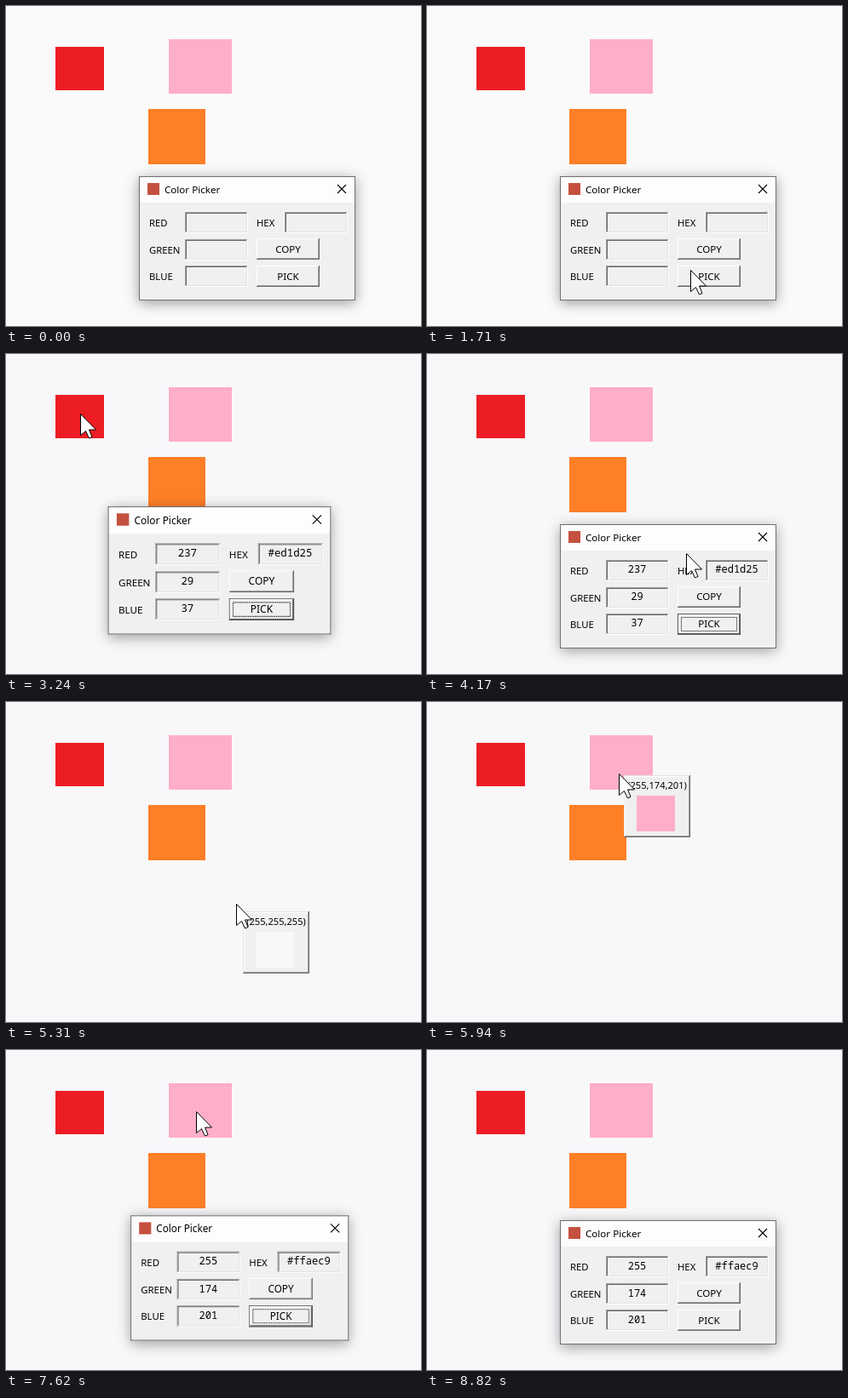
Animation, 487 px wide and 376 px high, one loop 8910 ms. Source, as an HTML page with a canvas:

```html
<!DOCTYPE html>
<html lang="en">
<head>
<meta charset="utf-8">
<title>Color Picker</title>
<style>
html, body { margin: 0; width: 100%; height: 100%; overflow: hidden; background: #fafafa; }
canvas { display: block; }
</style>
</head>
<body>
<canvas id="stage" width="487" height="376"></canvas>
<script>
const ctx = document.getElementById('stage').getContext('2d');
const LOOP = 8910;
const SANS = '"Noto Sans", "Open Sans", sans-serif';
const MONO = '"Noto Sans Mono", monospace';

// Clicks that start a pick, and the moments the dialog returns.
const PICK_1 = 1950, DONE_1 = 3240, PICK_2 = 4920, DONE_2 = 7530, BLUR = 8800;

const RED = [237, 29, 37], PINK = [255, 174, 201], ORANGE = [255, 127, 39];
const squares = [
  { x: 58, y: 48, w: 57, h: 51, rgb: RED },
  { x: 191, y: 39, w: 74, h: 64, rgb: PINK },
  { x: 167, y: 121, w: 67, h: 65, rgb: ORANGE }
];
const css = rgb => `rgb(${rgb})`;
const hex = rgb => '#' + rgb.map(v => v.toString(16).padStart(2, '0')).join('');

const smooth = u => u * u * (3 - 2 * u);
const drift = u => u ** 1.33;
const out = u => 1 - (1 - u) ** 2;

// Each move leaves the previous resting place; bend bows it sideways.
const START = { x: 490, y: 65 };
const moves = [
  { from: 390, to: 600, x: 451, y: 91 },
  { from: 930, to: 1350, x: 312, y: 281, bend: 0.08 },
  { from: 1560, to: 1710, x: 309, y: 310 },
  { from: 2010, to: 2790, x: 87, y: 70 },
  { from: 3360, to: 4110, x: 303, y: 232 },
  { from: 4140, to: 4500, x: 309, y: 319, bend: -0.07 },
  { from: 4920, to: 5790, x: 230, y: 70, bend: -0.05, ease: drift },
  { from: 5820, to: 6270, x: 200, y: 147 },
  { from: 6450, to: 6650, x: 112, y: 81, bend: 0.04, ease: out },
  { from: 6900, to: 7050, x: 223, y: 72 },
  { from: 7650, to: 8370, x: 330, y: 250 },
  { from: 8430, to: 8820, x: 492, y: 40 }
];

function pointer(t) {
  let { x, y } = START;
  for (const { from, to, x: x2, y: y2, bend = 0, ease = smooth } of moves) {
    if (t <= from) break;
    const e = ease(Math.min(1, (t - from) / (to - from)));
    const bow = bend * 4 * e * (1 - e);
    const dx = x2 - x, dy = y2 - y;
    x += dx * e - dy * bow;
    y += dy * e + dx * bow;
  }
  return { x, y };
}

function box(x, y, w, h, color) {
  ctx.fillStyle = color;
  ctx.fillRect(x, y, w, h);
}

function corner(x, y, w, h, light, dark) {
  box(x, y, w, 1, light);
  box(x, y, 1, h, light);
  box(x, y + h - 1, w, 1, dark);
  box(x + w - 1, y, 1, h, dark);
}

function bevel(x, y, w, h, outer, inner) {
  corner(x, y, w, h, ...outer);
  corner(x + 1, y + 1, w - 2, h - 2, ...inner);
}

function text(str, x, y, size = 11.3, align = 'left', font = SANS) {
  ctx.font = size + 'px ' + font;
  ctx.textAlign = align;
  ctx.fillStyle = '#000';
  ctx.fillText(str, x, y);
}

function field(x, y, value) {
  bevel(x, y, 74, 25, ['#a0a0a0', '#fff'], ['#696969', '#e3e3e3']);
  text(value, x + 36.5, y + 15.5, 12, 'center', MONO);
}

function button(label, y, focused) {
  bevel(294, y, 74, 25, ['#fff', '#696969'], ['#f0f0f0', '#a0a0a0']);
  if (focused) {
    bevel(294, y, 74, 25, ['#555', '#555'], ['#fff', '#696969']);
    ctx.strokeStyle = '#000';
    ctx.lineWidth = 1;
    ctx.setLineDash([1, 1]);
    ctx.strokeRect(298.5, y + 4.5, 65, 16);
    ctx.setLineDash([]);
  }
  text(label, 331, y + 16.5, 11.6, 'center');
}

function dialog(rgb, focused) {
  ctx.save();
  ctx.shadowColor = 'rgba(0,0,0,.38)';
  ctx.shadowBlur = 15;
  ctx.shadowOffsetY = 3;
  box(156, 200, 254, 146, '#f0f0f0');
  ctx.restore();
  box(157, 201, 252, 30, '#fdfdfd');
  corner(156, 200, 254, 146, '#707070', '#707070');
  box(166, 208, 14, 14, '#c4503f');
  text('Color Picker', 186, 220, 11.6);

  ctx.strokeStyle = '#000';
  ctx.lineWidth = 1.1;
  ctx.beginPath();
  ctx.moveTo(389, 210); ctx.lineTo(399, 220);
  ctx.moveTo(399, 210); ctx.lineTo(389, 220);
  ctx.stroke();

  ['RED', 'GREEN', 'BLUE'].forEach((name, i) => {
    const y = Math.round(242 + 31.5 * i);
    text(name, 168, y + 17);
    field(210, y, rgb ? rgb[i] : '');
  });
  text('HEX', 294, 259);
  field(327, 242, rgb ? hex(rgb) : '');
  button('COPY', 273, false);
  button('PICK', 305, focused);
}

function drawDialog(t) {
  const [shown, hidden, rgb] =
    t < DONE_1 ? [-LOOP, PICK_1, null] :
    t < DONE_2 ? [DONE_1, PICK_2, RED] : [DONE_2, LOOP, PINK];
  const open = Math.exp((shown - t) / 69);
  const close = Math.max(0, (t - hidden) / 200);
  if (close >= 1) return;
  const scale = 1 + 0.031 * open - 0.08 * close;

  ctx.save();
  ctx.globalAlpha = 1 - close;
  ctx.translate(283 - 33 * open, 273 - 19 * open);
  ctx.scale(scale, scale);
  ctx.translate(-283, -273);
  dialog(rgb, t >= PICK_1 && t < BLUR);
  ctx.restore();
}

// The colour tip trails slightly behind the pointer.
function drawTip(t, paper) {
  if (!(t >= PICK_1 && t < DONE_1 || t >= PICK_2 && t < DONE_2)) return;
  const p = pointer(t - 15);
  const hit = squares.find(s => p.x >= s.x && p.x < s.x + s.w && p.y >= s.y && p.y < s.y + s.h);
  const rgb = hit ? hit.rgb : [255, 255, 255];
  const x = Math.round(p.x + 5.5), y = Math.round(p.y + 5);
  box(x, y, 78, 73, '#f0f0f0');
  bevel(x, y, 78, 73, ['#e3e3e3', '#696969'], ['#fff', '#a0a0a0']);
  text(`(${rgb})`, x + 39, y + 16, 11.1, 'center');
  box(x + 15, y + 24, 45, 42, hit ? css(rgb) : paper);
}

function drawPointer(t) {
  const { x, y } = pointer(t);
  ctx.save();
  ctx.translate(Math.round(x) + 0.5, Math.round(y) + 0.5);
  ctx.beginPath();
  [[0, 0], [0, 25], [6, 20], [10, 28.5], [13.5, 27], [10, 18.5], [18, 18.5]]
    .forEach(p => ctx.lineTo(...p));
  ctx.closePath();
  ctx.fillStyle = '#fff';
  ctx.strokeStyle = '#000';
  ctx.lineWidth = 1;
  ctx.fill();
  ctx.stroke();
  ctx.restore();
}

function frame(now) {
  const t = now % LOOP;
  const paper = t < PICK_1 ? '#fafafa' : '#f8f8fb';
  box(0, 0, 487, 376, paper);
  squares.forEach(s => box(s.x, s.y, s.w, s.h, css(s.rgb)));
  drawDialog(t);
  drawTip(t, paper);
  drawPointer(t);
  requestAnimationFrame(frame);
}
requestAnimationFrame(frame);
</script>
</body>
</html>
```
